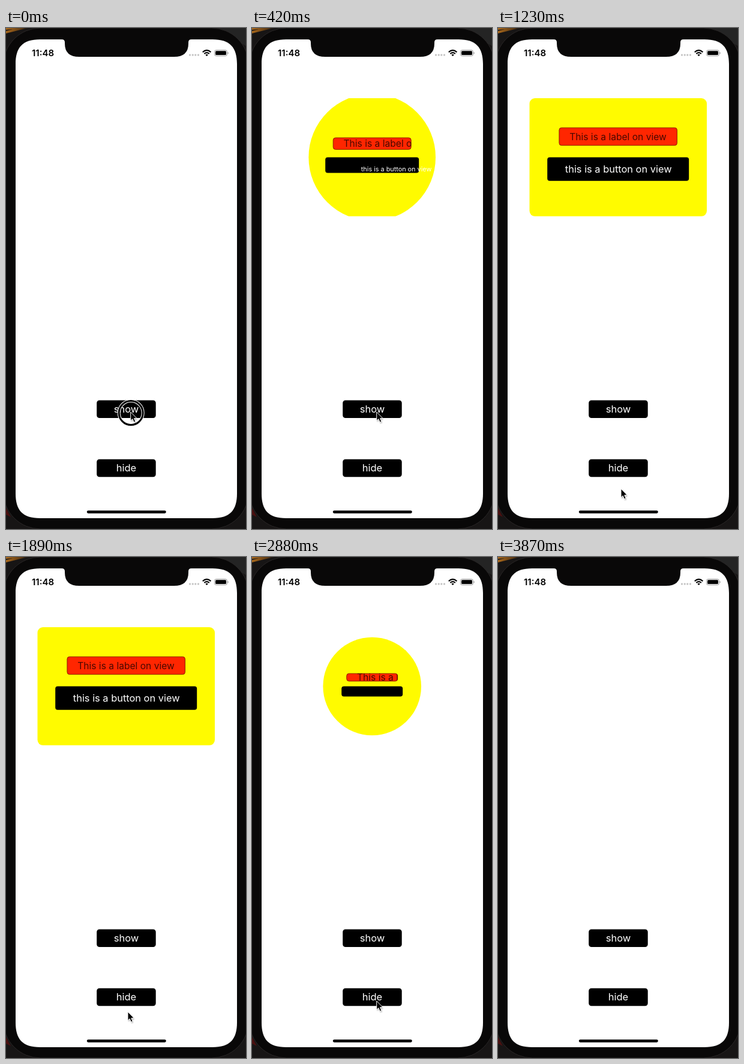
Write an HTML page that moves like this. It is 400 px wide and 835 px high and loops after 3.99 s.

```html
<!DOCTYPE html>
<html lang="en">
<head>
<meta charset="utf-8">
<title>Circular reveal</title>
<style>
  html, body { margin: 0; width: 100%; height: 100%; overflow: hidden; background: #090808; }
  svg { display: block; width: 400px; height: 835px; font-family: Inter, Roboto, sans-serif; }
  .btn { font-size: 16.5px; fill: #fff; text-anchor: middle; }
</style>
</head>
<body>
<svg viewBox="0 0 400 835">
  <defs>
    <clipPath id="reveal"><circle id="hole" cx="200.2" cy="215.5" r="0"/></clipPath>
    <clipPath id="labelClip"><rect id="labelEdge" rx="4"/></clipPath>
    <linearGradient id="gold"><stop stop-color="#a8681c"/><stop offset="1" stop-color="#3a2410"/></linearGradient>
    <filter id="soft" x="-50%" y="-50%" width="200%" height="200%"><feGaussianBlur stdDeviation="1.1"/></filter>
    <filter id="blur" x="-10%" y="-30%" width="120%" height="160%"><feGaussianBlur stdDeviation=".45"/></filter>
  </defs>

  <!-- desktop corners and bezel -->
  <rect width="400" height="835" fill="#171515"/>
  <path d="M0 3L38 0H0Z M0 9L36 0H20L0 5Z" fill="url(#gold)"/>
  <path d="M345 0H400V30Z" fill="#242424"/>
  <path d="M0 800L8 815L0 811Z" fill="#4a1010"/>
  <rect x="-4.5" y="0" width="409" height="835" rx="62" fill="#090808" stroke="#292626"/>

  <!-- screen with notch -->
  <path fill="#fff" d="M57 19H93Q98 19 98 24V26Q98 48 122 48H280Q304 48 304 26V24Q304 19 309 19H344
    C374 19 385 33 385 60V776C385 803 374 817 344 817H57C27 817 16 803 16 776V60C16 33 27 19 57 19Z"/>

  <!-- status bar -->
  <text x="43" y="47" font-size="15" font-weight="600">11:48</text>
  <g fill="#c4c4c4">
    <rect x="305" y="43.5" width="3" height="3" rx="1"/><rect x="309.7" y="43.5" width="3" height="3" rx="1"/>
    <rect x="314.3" y="43.5" width="3" height="3" rx="1"/><rect x="319" y="43.5" width="3" height="3" rx="1"/>
  </g>
  <g fill="none" stroke="#000" stroke-width="2.2">
    <path d="M327.8 40.2Q334.6 34.2 341.4 40.2"/><path d="M330.4 43Q334.6 39.4 338.8 43"/>
  </g>
  <path d="M332.4 44.7Q334.6 43 336.8 44.7L334.6 47Z"/>
  <rect x="347.5" y="36.8" width="21" height="9.8" rx="2.8" fill="none" stroke="#999"/>
  <rect x="349" y="38.3" width="18" height="6.8" rx="1.5"/>
  <path d="M369.6 40V43.6Q371 43 371 41.8Q371 40.6 369.6 40Z" fill="#999"/>

  <!-- revealed panel -->
  <g id="panel" clip-path="url(#reveal)">
    <rect x="52.5" y="117" width="295.5" height="196.8" rx="9" fill="#fffb00"/>
    <rect id="label" rx="4" fill="#ff2600" stroke="#701000" stroke-width=".8"/>
    <g clip-path="url(#labelClip)">
      <text id="labelText" font-size="15.6" fill="#480800" filter="url(#blur)">This is a label on view</text>
    </g>
    <rect id="button" rx="4"/>
    <text id="buttonText" class="btn" style="font-size:16.4px" y="5.8">this is a button on view</text>
  </g>

  <!-- controls -->
  <rect x="151.2" y="620.5" width="98.5" height="29.5" rx="4.5"/>
  <text class="btn" x="200.5" y="641">show</text>
  <rect x="151.2" y="718.7" width="98.5" height="29.5" rx="4.5"/>
  <text class="btn" x="200.5" y="739">hide</text>
  <rect x="134.8" y="804.2" width="132" height="4.8" rx="2.4"/>

  <!-- pointer -->
  <g id="pointer">
    <g id="ring" fill="none">
      <circle cx=".5" cy="1.5" r="20" stroke="#fff" stroke-width="5"/>
      <circle cx=".5" cy="1.5" r="20" stroke="#000" stroke-width="3"/>
    </g>
    <path d="M0 0V14.4L3.2 11.6L5.5 17L8.1 15.9L5.8 10.7L10.2 10.4Z" transform="translate(1 2)" fill="#000" opacity=".35" filter="url(#soft)"/>
    <path d="M0 0V14.4L3.2 11.6L5.5 17L8.1 15.9L5.8 10.7L10.2 10.4Z" stroke="#fff" stroke-width="1"/>
  </g>
</svg>
<script>
const LOOP = 3990, CX = 200.2, CY = 215.5, RADIUS = 177.7;
const SHOW = { at: 153, span: 450 }, HIDE = { at: 2622, span: 480 };
// pointer stops: time, x, y
const PATH = [
  [0, 207.7, 640], [930, 207.7, 640], [1230, 205, 768], [1500, 205, 768],
  [1890, 203, 758], [2040, 203, 758], [2460, 207.7, 740], [3540, 207.7, 740], [3870, 205, 855]
];

const $ = id => document.getElementById(id);
const clamp = v => Math.min(1, Math.max(0, v));
const phase = (t, a, span) => clamp((t - a) / span);
const set = (el, attrs) => { for (const k in attrs) el.setAttribute(k, attrs[k]); };

// cubic-bezier(.42, 0, .58, 1)
function easeInOut(x) {
  let lo = 0, hi = 1, u = x;
  for (let i = 0; i < 24; i++) {
    u = (lo + hi) / 2;
    const bx = 1.26 * u * (1 - u) ** 2 + 1.74 * u * u * (1 - u) + u ** 3;
    if (bx < x) lo = u; else hi = u;
  }
  return u * u * (3 - 2 * u);
}

function pointerAt(t) {
  for (let i = 1; i < PATH.length; i++) {
    const [t0, x0, y0] = PATH[i - 1], [t1, x1, y1] = PATH[i];
    if (t < t1) {
      const k = easeInOut((t - t0) / (t1 - t0));
      return [x0 + (x1 - x0) * k, y0 + (y1 - y0) * k];
    }
  }
  return PATH[PATH.length - 1].slice(1);
}

function ringAt(t) {
  if (t < 1000) return 1 - phase(t, 30, 100);
  return t < 2490 ? 0 : 1 - phase(t, 2570, 80);
}

function drawPanel(t) {
  const hiding = t >= HIDE.at;
  const { at, span } = hiding ? HIDE : SHOW;
  const p = phase(t, at, span);
  const open = hiding ? 1 - p : p;
  const s = hiding ? 1 - easeInOut(p) : easeInOut(p);

  $('panel').style.display = open > 0 ? '' : 'none';
  $('hole').setAttribute('r', open < 1 ? RADIUS * open : 2 * RADIUS);

  const box = { x: CX - 98.3 * s, y: CY - 49.3 * s, width: 196.6 * s, height: 29.5 * s };
  set($('label'), box);
  set($('labelEdge'), box);
  set($('labelText'), { x: box.x + 17.3, y: box.y + box.height / 2 + 5.8 });
  set($('button'), { x: CX - 118 * s, y: CY, width: 236 * s, height: 39.2 * s });

  const caption = $('buttonText');
  caption.style.display = hiding ? 'none' : '';
  caption.setAttribute('transform', `translate(${200.7 + 117.5 * (1 - s)} 235.3) scale(${s})`);
}

function draw(t) {
  drawPanel(t);
  const [x, y] = pointerAt(t);
  $('pointer').setAttribute('transform', `translate(${x} ${y})`);
  $('pointer').style.display = t < 3870 ? '' : 'none';
  $('ring').setAttribute('opacity', ringAt(t));
}

const start = performance.now();
function tick() {
  draw((performance.now() - start) % LOOP);
  requestAnimationFrame(tick);
}
draw(0);
requestAnimationFrame(tick);
</script>
</body>
</html>
```
